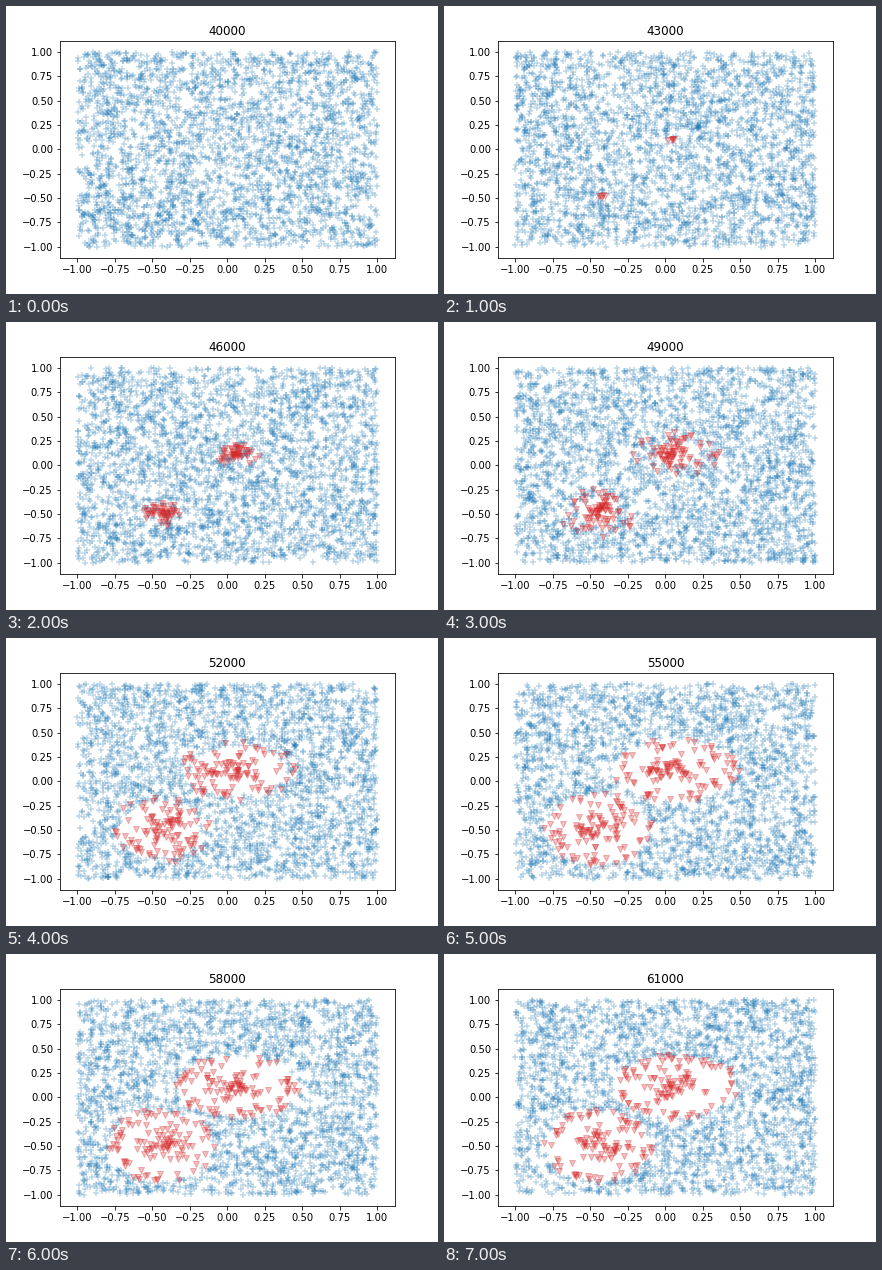
These frames come from a looping animation (432 px wide and 288 px high, 8 s). A matplotlib script:

```python
import numpy as np
import matplotlib.pyplot as plt
from matplotlib.animation import FuncAnimation

SAMPLES = 3000
FRAMES = 8
ALPHA = 0.3
LIMIT = 1.116

# Each region: core centre, ellipse centre, half axes
REGIONS = [((0.04, 0.11), (0.07, 0.11), (0.41, 0.32)),
           ((-0.43, -0.48), (-0.45, -0.50), (0.35, 0.36))]

fig = plt.figure(figsize=(6, 4), dpi=72, facecolor="white")
fig.subplots_adjust(left=0.125, right=0.9, bottom=0.125, top=0.88)
ax = fig.add_subplot()


def growth(k):
    """Ease out from 0 at step 1 to 1 at step 5, then hold."""
    return np.sin(np.pi / 2 * np.clip((k - 1) / 4, 0, 1))


def background(rng, clear):
    pts = rng.uniform(-1, 1, (SAMPLES, 2))
    for _, centre, axes in REGIONS:
        dist = np.hypot(*((pts - centre) / axes).T)
        pts = pts[dist >= clear]
    return pts


def cluster(rng, k, core, centre, axes):
    grow = growth(k)
    total = int(5 + 115 * grow) if k else 0
    rims = int(total * 0.5 * grow)
    spread = 0.05 + 0.21 * grow
    inner = rng.normal(0, spread, (total - rims, 2)) * axes + core
    # The rim moves outwards and its band narrows with time
    radius = 1.04 * grow * rng.uniform(0.35 + 0.5 * k / FRAMES, 1, rims)
    angle = rng.uniform(0, 2 * np.pi, rims)
    rim = radius * np.array([np.cos(angle), np.sin(angle)])
    return np.vstack([inner, rim.T * axes + centre])


def draw(k):
    rng = np.random.default_rng(40 + k)
    blue = background(rng, growth(k) ** 3)
    red = np.vstack([cluster(rng, k, *region) for region in REGIONS])
    ax.clear()
    ax.scatter(*blue.T, marker="+", c="tab:blue", alpha=ALPHA)
    ax.scatter(*red.T, marker="v", c="tab:red", alpha=ALPHA)
    ticks = np.linspace(-1, 1, 9)
    ax.set(xlim=(-LIMIT, LIMIT), ylim=(-LIMIT, LIMIT),
           xticks=ticks, yticks=ticks, title=str(40000 + SAMPLES * k))
    return ax.collections


anim = FuncAnimation(fig, draw, frames=FRAMES, init_func=lambda: [],
                     interval=1000, repeat=True, repeat_delay=0)
plt.show()
```
